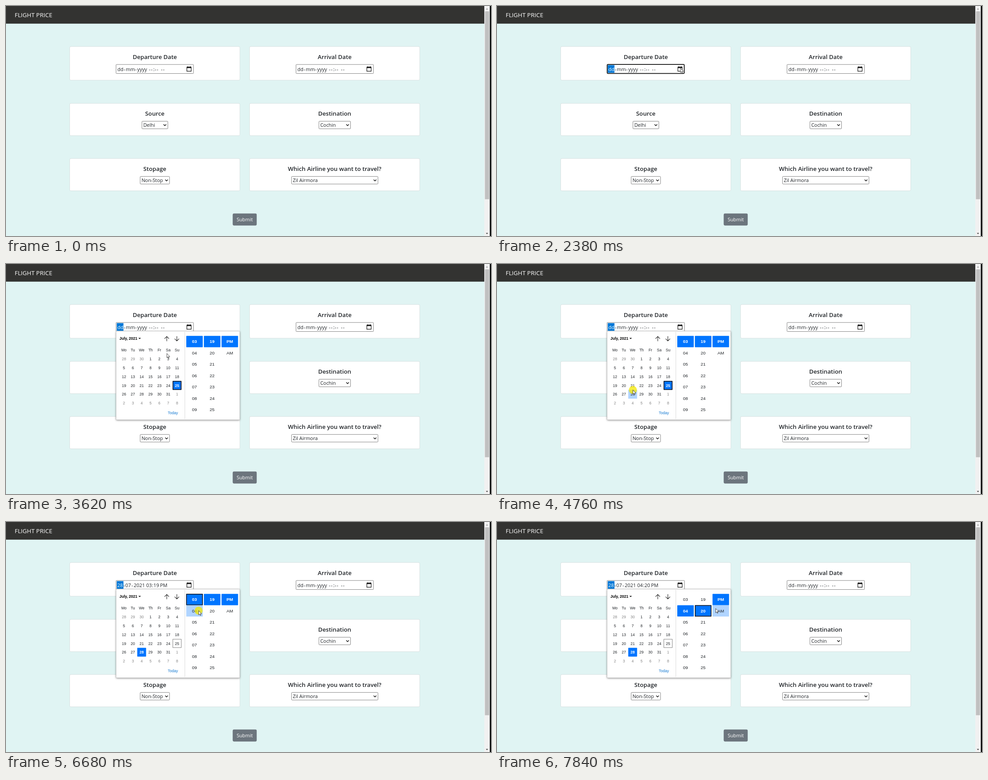
An HTML page for the animation above (8 s loop, 1086 by 516 pixels).

```html
<!DOCTYPE html>
<html lang="en">
<head>
<meta charset="utf-8">
<title>Flight price form</title>
<style>
html, body { margin: 0; width: 100%; height: 100%; overflow: hidden; background: #e0f4f3; }
svg { display: block; width: 1086px; height: 516px; }
.ui { font-family: "Open Sans", "Noto Sans", sans-serif; font-size: 10.9px; }
.cal { font-family: "Liberation Sans", Arial, sans-serif; font-size: 8.5px; }
.time { font-size: 9.9px; }
.mid { text-anchor: middle; }
.head { font-size: 13.2px; font-weight: 600; }
.bold { font-weight: 700; }
.dash { letter-spacing: .9px; }
</style>
</head>
<body>
<svg viewBox="0 0 1086 516">
  <defs>
    <filter id="shadow" x="-5%" y="-5%" width="110%" height="112%">
      <feDropShadow dx="0" dy="1" stdDeviation="2" flood-opacity=".5"/>
    </filter>
  </defs>
  <g id="page"></g>
  <g id="live"></g>
</svg>
<script>
const LOOP = 8000, INK = "#212529", BLUE = "#0075ff", HOVER = "#b0d4ff";

const rect = (x, y, w, h, fill, extra = "") =>
  `<rect x="${x}" y="${y}" width="${w}" height="${h}" fill="${fill}" ${extra}/>`;
const text = (x, y, str, cls, fill = INK) =>
  `<text x="${x}" y="${y}" class="${cls}" fill="${fill}">${str}</text>`;
const line = (d, color, width, extra = "") =>
  `<path d="${d}" fill="none" stroke="${color}" stroke-width="${width}" ${extra}/>`;
const shape = (d, fill) => `<path d="${d}" fill="${fill}"/>`;

// ---- form ----
const MASK = [[249.5, "dd"], [263.4, "-"], [268.3, "mm"], [289, "-"], [293.8, "yyyy"],
              [320, "--"], [329.8, ":"], [333, "--"], [347, "--"]];
const filled = (hour, minute) =>
  [[249.2, "28"], [262.9, "-"], [267.3, "07"], [281, "-"], [286, "2021"],
   [314, hour], [327, ":"], [330.3, minute], [345, "PM"]];

function dateField(dx, parts, selected, focused) {
  let s = focused
    ? rect(246.7, 131.2, 172.6, 20.1, "#fff", 'rx="1.5" stroke="#101010" stroke-width="1.8"')
    : rect(246.4 + dx, 131.2, 173.4, 20.3, "#fff", 'rx="1" stroke="#767676" stroke-width=".9"');
  if (selected) s += rect(248, 132.6, 15, 17.2, "#0078d7");
  parts.forEach(([x, str], i) => {
    s += text(x + dx, 145.6, str, str == "--" ? "ui dash" : "ui", selected && !i ? "#fff" : INK);
  });
  const x = 405 + dx;
  return s + line(`M${x} 137h9.6v9.4h-9.6z`, "#111", 1.2) + rect(x, 136.6, 9.6, 2.6, "#111")
    + rect(x + 1.6, 135.3, 1.3, 2, "#111") + rect(x + 6.8, 135.3, 1.3, 2, "#111");
}

const card = (x, y, h, title) =>
  rect(x, y, 381, h, "#fff", 'rx="2.6" stroke="#000" stroke-opacity=".125" stroke-width=".8"')
  + text(x + 190.5, y + 28, title, "ui head mid");

const select = (x, y, w, value) =>
  rect(x, y, w, 17, "#fff", 'rx="1.5" stroke="#767676" stroke-width=".9"')
  + text(x + 3, y + 12.8, value, "ui")
  + line(`M${x + w - 9.7} ${y + 7}l3 3 3-3`, "#111", 1.4);

document.getElementById("page").innerHTML =
  rect(0, 0, 1086, 516, "#e0f4f3")
  + rect(0, 0, 1071, 39.6, "#333331")
  + `<text x="19.5" y="25" class="ui" style="font-size:13.4px" fill="#fff">FLIGHT PRICE</text>`
  + card(142.7, 91, 75.4, "Departure Date") + card(545.4, 91, 75.4, "Arrival Date")
  + card(142.7, 218.4, 72.4, "Source") + card(545.4, 218.4, 72.4, "Destination")
  + card(142.7, 342.2, 72.4, "Stopage") + card(545.4, 342.2, 72.4, "Which Airline you want to travel?")
  + dateField(403, MASK)
  + select(304.4, 258.5, 58, "Delhi") + select(700.7, 258.5, 70.8, "Cochin")
  + select(300.4, 382.4, 65.8, "Non-Stop") + select(639.3, 382.4, 193.6, "Zil Airmora")
  + rect(507.6, 465.6, 53.8, 26.8, "#6c757d", 'rx="2.8"')
  + text(534.5, 483.2, "Submit", "ui mid", "#fff")
  + rect(1071, 0, 12.4, 516, "#f1f1f1") + rect(1072.4, 12, 9.6, 421.5, "#c1c1c1")
  + shape("M1074.5 8h5l-2.5-3z", "#a3a3a3") + shape("M1074.5 509h5l-2.5 3z", "#505050")
  + rect(1083.4, 0, 2.6, 516, "#000");

// ---- date and time picker ----
const COL = 19.8, ROW = 19.8, SLOT = 25.45;
const inside = (p, x, y, w, h) => p[0] >= x && p[0] < x + w && p[1] >= y && p[1] < y + h;
const ring = (x, y, w, h) => rect(x + .7, y + .7, w - 1.4, h - 1.4, "none", 'stroke="#101010" stroke-width="1.5"');

function calendar(p, day, focused) {
  let s = text(254, 169.8, "July, 2021", "cal bold", "#000") + shape("M296.6 165.8h5.4l-2.7 2.8z", "#000")
    + line("M360 173.2v-10.6m-5 5l5-5 5 5M382.6 162v10.6m-5-5l5 5 5-5", "#222", 1.1)
    + text(373.6, 337.2, "Today", "cal mid", "#1278d1");
  ["Mo", "Tu", "We", "Th", "Fr", "Sa", "Su"].forEach((d, i) => {
    s += text(264.2 + i * COL, 196.3, d, "cal mid");
  });
  for (let i = 0; i < 42; i++) {
    const other = i < 3 || i > 33;
    const n = i < 3 ? 28 + i : i < 34 ? i - 2 : i - 33;
    const x = 254.3 + i % 7 * COL, y = 203.1 + Math.floor(i / 7) * ROW;
    const on = !other && n == day;
    if (on) s += rect(x, y, COL, ROW, BLUE, 'rx="1"');
    else if (inside(p, x, y, COL, ROW)) s += rect(x, y, COL, ROW, HOVER);
    if (on && focused) s += ring(x, y, COL, ROW);
    if (!on && !other && n == 25)
      s += rect(x + .5, y + .5, COL - 1, ROW - 1, "none", 'stroke="#767676" stroke-width=".9"');
    s += text(x + COL / 2, y + 13, n, on ? "cal mid bold" : "cal mid", on ? "#fff" : other ? "#858585" : INK);
  }
  return s;
}

function timeColumn(p, x, values, chosen, focused) {
  return values.map((v, i) => {
    const y = 161.2 + i * SLOT, on = v == chosen;
    let s = "";
    if (on) s += rect(x, y, 37, SLOT, BLUE, 'rx="1"');
    else if (inside(p, x, y, 37, SLOT)) s += rect(x, y, 37, SLOT, HOVER);
    if (on && focused) s += ring(x, y, 37, SLOT);
    return s + text(x + 18.5, y + 16.2, v, on ? "cal time mid bold" : "cal time mid", on ? "#fff" : INK);
  }).join("");
}

const count = from => Array.from({ length: 7 }, (_, i) => String(from + i).padStart(2, "0"));

function picker(t, p, hour, minute) {
  const picked = t >= 4960;
  return rect(246.7, 150.8, 276.6, 198.6, "#fff", 'filter="url(#shadow)"')
    + rect(246.7, 150.8, 276.6, 198.6, "none", 'stroke="#b5b5b5" stroke-width=".7"')
    + rect(400.2, 152, .8, 196, "#d0d0d0")
    + calendar(p, picked ? 28 : 25, t < 6680)
    + timeColumn(p, 403.6, count(3), hour, t >= 6680 && t < 7430)
    + timeColumn(p, 443.1, count(19), minute, t >= 7430)
    + timeColumn(p, 482.6, ["PM", "AM"], "PM", false);
}

// ---- pointer: first step, last step, number of steps, end point ----
const START = [888.5, 565.5];
const MOVES = [
  [460, 600, 3, 771.5, 375],
  [800, 1010, 4, 447.5, 221],
  [1280, 1280, 1, 411.5, 203],
  [1350, 2040, 10, 410.7, 139.5],
  [2990, 3480, 8, 351, 196],
  [3550, 3620, 2, 360.2, 200.7],
  [3690, 3750, 2, 378, 250],
  [3820, 4100, 5, 304.3, 282.5],
  [5360, 5430, 2, 302, 262],
  [5500, 5850, 6, 385, 147],
  [5920, 6130, 4, 425.5, 168],
  [6200, 6540, 6, 431.3, 198.8],
  [7020, 7230, 4, 464, 197],
  [7640, 7840, 4, 489.6, 194]
];
const PRESSES = [[2040, 2250], [4760, 4960], [6680, 6820], [7430, 7570]];

function pointer(t) {
  let [x, y] = START;
  for (const [t0, t1, n, ex, ey] of MOVES) {
    if (t < t0) break;
    const k = t >= t1 ? 1 : (Math.floor((t - t0) / (t1 - t0) * (n - 1) + .05) + 1) / n;
    x += (ex - x) * k;
    y += (ey - y) * k;
  }
  return [x, y];
}

function scene(t) {
  const p = pointer(t), open = t >= 2450;
  const hour = t < 6820 ? "03" : "04", minute = t < 7570 ? "19" : "20";
  let s = dateField(0, t < 4960 ? MASK : filled(hour, minute), t >= 2040, t >= 2040 && !open);
  if (open) s += picker(t, p, hour, minute);
  if (PRESSES.some(([a, b]) => t >= a && t < b))
    s += `<circle cx="${p[0]}" cy="${p[1]}" r="9" fill="#f4e800" fill-opacity=".75"/>`;
  return s + `<path transform="translate(${p})" d="M0 0V9.6L2.2 7.6 3.7 10.9 5.1 10.3 3.7 7.1H6.7Z"
    fill="#fff" stroke="#222" stroke-width=".8"/>`;
}

const live = document.getElementById("live");
let shown = "";
function frame() {
  const next = scene(performance.now() % LOOP);
  if (next != shown) live.innerHTML = shown = next;
  requestAnimationFrame(frame);
}
frame();
</script>
</body>
</html>
```
